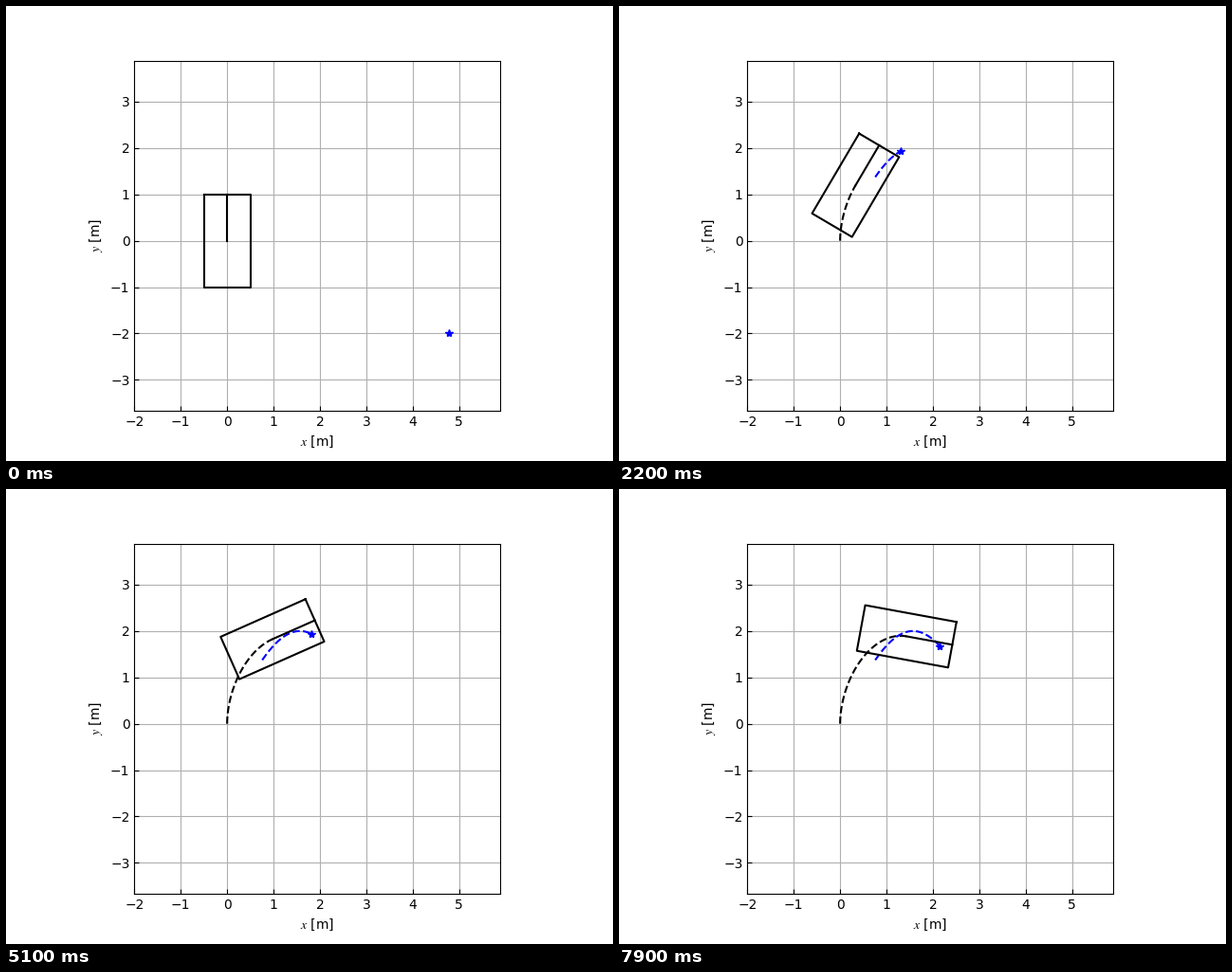
These frames come from a looping animation (640 px wide and 480 px high, 8000 ms). A matplotlib script:

```python
import numpy as np
import matplotlib.pyplot as plt
from matplotlib.animation import FuncAnimation

plt.rcParams.update({
    "font.family": "DejaVu Sans",
    "mathtext.fontset": "stix",
    "xtick.direction": "in",
    "ytick.direction": "in",
})

W, H, DPI = 640, 480, 100
FRAMES, STEP_MS, SUBSTEPS = 80, 100, 20
LENGTH, WIDTH = 2.0, 1.0
REF_START, REF_END = 0.757, 4.79


def slowing(t, extra, cruise, fade=3.42):
    """Rate that settles from cruise + extra down to cruise."""
    return cruise + extra * np.exp(-(t / fade) ** 2)


def integrate(rate):
    """Running integral of fine-step rates, sampled once per frame."""
    return np.append(0, np.cumsum(rate) * dt)[::SUBSTEPS]


def turn(t):
    """Vehicle heading: a short initial swing, then a steady turn."""
    return np.radians(90 - 12.25 * t - 3.6 * (1 - np.exp(-2 * t)))


# Unicycle motion, integrated at the middle of each small step
dt = STEP_MS / 1000 / SUBSTEPS
mid = (np.arange((FRAMES - 1) * SUBSTEPS) + 0.5) * dt
speed = slowing(mid, 0.48, 0.15)
heading = turn(np.arange(FRAMES) * STEP_MS / 1000)
car_x = integrate(speed * np.cos(turn(mid)))
car_y = integrate(speed * np.sin(turn(mid)))

# Reference point sliding along a sine path; it starts on the second step
ref_x = integrate(slowing(mid, 0.17, 0.115))
ref_x += REF_START - ref_x[1]
ref_x[0] = REF_END
ref_y = 2 * np.sin(ref_x)

# Closed body outline in the vehicle frame
body = np.array([[1, 1], [1, -1], [-1, -1], [-1, 1], [1, 1]]) * [LENGTH / 2, WIDTH / 2]
nose = np.array([[0, 0], [LENGTH / 2, 0]])


def place(points, k):
    c, s = np.cos(heading[k]), np.sin(heading[k])
    x, y = points.T
    return car_x[k] + c * x - s * y, car_y[k] + s * x + c * y


fig = plt.figure(figsize=(W / DPI, H / DPI), dpi=DPI, facecolor="white")
ax = fig.add_axes([135.35 / W, 0.11, 385.5 / W, 0.77])
ax.set_xlim(-2, 5.883)
ax.set_ylim(-3.672, 3.8865)
ax.set_xticks(range(-2, 6))
ax.set_yticks(range(-3, 4))
ax.set_xlabel("$x$ [m]")
ax.set_ylabel("$y$ [m]")
ax.grid(True)

car_trace, = ax.plot([], [], "k--", lw=1.5)
ref_trace, = ax.plot([], [], "b--", lw=1.5)
outline, = ax.plot([], [], "k", lw=1.5)
nose_line, = ax.plot([], [], "k", lw=1.5)
star, = ax.plot([], [], "b*", ms=6)


def draw(k):
    outline.set_data(*place(body, k))
    nose_line.set_data(*place(nose, k))
    car_trace.set_data(car_x[:k + 1], car_y[:k + 1])
    ref_trace.set_data(ref_x[1:k + 1], ref_y[1:k + 1])
    star.set_data([ref_x[k]], [ref_y[k]])
    return car_trace, ref_trace, outline, nose_line, star


anim = FuncAnimation(fig, draw, frames=FRAMES, interval=STEP_MS,
                     repeat=True, repeat_delay=0)
plt.show()
```
